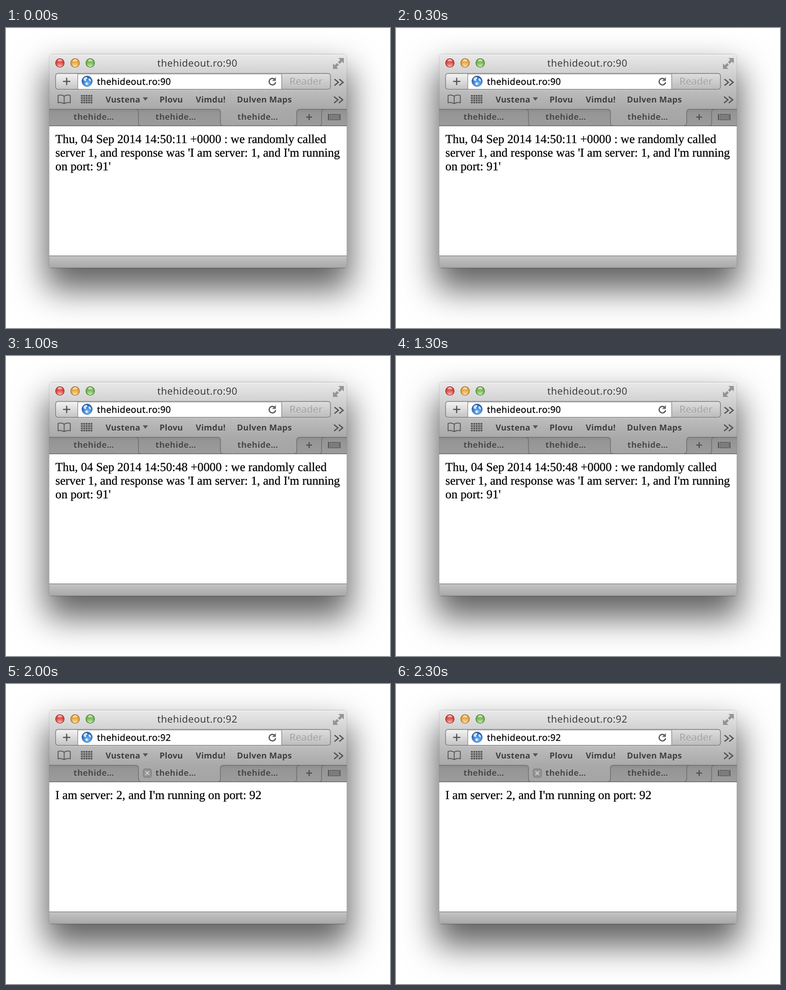
Recreate the animation shown at these times as an HTML page. Size 848 by 660 pixels, loop 2500 ms.

```html
<!DOCTYPE html>
<html lang="en">
<head>
<meta charset="utf-8">
<title>Load balancer demo</title>
<style>
  html, body { margin: 0; width: 100%; height: 100%; overflow: hidden; background: #fff; }
  .shadow {
    position: absolute; left: 96px; top: 58px; width: 656px; height: 470px;
    border-radius: 6px; box-shadow: 0 40px 72px 8px rgba(0, 0, 0, .62), 0 0 1px 1px rgba(0, 0, 0, .2);
  }
  svg { position: absolute; left: 0; top: 0; display: block; }
  text { font-family: "Noto Sans", "Open Sans", sans-serif; white-space: pre; text-rendering: geometricPrecision; }
  .title { font-size: 21.6px; letter-spacing: .45px; fill: #3b3b3b; text-anchor: middle; text-shadow: 0 1px rgba(255, 255, 255, .5); }
  .url { font-size: 20px; letter-spacing: .38px; }
  .url, .body { stroke: #000; stroke-width: .3; }
  .reader { font-size: 21.6px; letter-spacing: .2px; fill: #a0a0a0; text-shadow: 0 1px rgba(255, 255, 255, .5); }
  .label { font-size: 18.3px; font-weight: 700; letter-spacing: .3px; fill: #3d3d3d; text-shadow: 0 1px rgba(255, 255, 255, .35); }
  .tab { letter-spacing: .45px; fill: #474747; }
  .body { font: 26.75px "Liberation Serif", Times, serif; }
  .icon { fill: none; stroke: #515151; stroke-width: 2.6; }
  .thin { stroke-width: 1.8; }
  .edge { fill: none; stroke: #6c6c6c; stroke-width: 1.5; }
  .scene { opacity: 0; animation: show 2.5s step-end infinite; animation-delay: calc((var(--i) - 5) * .5s); }
  @keyframes show { 0% { opacity: 1; } 20%, 100% { opacity: 0; } }
</style>
</head>
<body>
<div class="shadow"></div>
<svg width="848" height="660" viewBox="0 0 848 660">
  <defs>
    <linearGradient id="chrome" x2="0" y2="1">
      <stop stop-color="#e9e9e9"/><stop offset=".65" stop-color="#bdbdbd"/><stop offset="1" stop-color="#a9a9a9"/>
    </linearGradient>
    <linearGradient id="strip" x2="0" y2="1">
      <stop stop-color="#888"/><stop offset=".2" stop-color="#959595"/><stop offset="1" stop-color="#9c9c9c"/>
    </linearGradient>
    <linearGradient id="front" x2="0" y2="1"><stop stop-color="#a9a9a9"/><stop offset="1" stop-color="#a5a5a5"/></linearGradient>
    <linearGradient id="foot" x2="0" y2="1"><stop stop-color="#c2c2c2"/><stop offset="1" stop-color="#a8a8a8"/></linearGradient>
    <linearGradient id="button" x2="0" y2="1"><stop stop-color="#f4f4f4"/><stop offset="1" stop-color="#c4c4c4"/></linearGradient>
    <linearGradient id="dim" x2="0" y2="1"><stop stop-color="#dedede"/><stop offset="1" stop-color="#bcbcbc"/></linearGradient>
    <linearGradient id="gloss" x2="0" y2="1">
      <stop stop-color="#fff" stop-opacity=".9"/><stop offset="1" stop-color="#fff" stop-opacity=".1"/>
    </linearGradient>
    <radialGradient id="glow" cy=".95" r=".6">
      <stop stop-color="#fff" stop-opacity=".65"/><stop offset="1" stop-color="#fff" stop-opacity="0"/>
    </radialGradient>
    <radialGradient id="sea" cx=".55" cy=".75" r=".8">
      <stop stop-color="#7cc4fa"/><stop offset=".5" stop-color="#3b86d8"/><stop offset="1" stop-color="#1f4f9e"/>
    </radialGradient>
    <clipPath id="frame"><path d="M95.5 64q0-6 6-6h645q6 0 6 6v458q0 6-6 6h-645q-6 0-6-6z"/></clipPath>
    <g id="more" class="icon"><path d="M0 0l8.5 7-8.5 7M10.5 0l8.5 7-8.5 7"/></g>
  </defs>

  <g clip-path="url(#frame)">
    <rect x="95" y="58" width="658" height="121" fill="url(#chrome)"/>
    <path d="M95 58.8h658" stroke="#f6f6f6" stroke-width="1.2"/>
    <rect x="95" y="178" width="658" height="38" fill="url(#strip)"/>
    <path d="M95 178.6h658" stroke="#6c6c6c" stroke-width="1.4"/>
    <rect x="95" y="216" width="658" height="286" fill="#fff"/>
    <rect x="95" y="502" width="658" height="26" fill="url(#foot)"/>
    <path d="M95 501.5h658" stroke="#6a6a6a" stroke-width="1.5"/>
    <path d="M95 503h658" stroke="#d8d8d8"/>
    <path d="M95 527.5h658" stroke="#8a8a8a"/>
  </g>

  <g id="lights"></g>
  <path d="M746 66v12l-4-4-5 5-4-4 5-5-4-4zM722 90v-12l4 4 5-5 4 4-5 5 4 4z" fill="#959595"/>

  <!-- address row -->
  <path d="M159 100h-44q-5.5 0-5.5 5.5v24q0 5.5 5.5 5.5h44z" fill="url(#button)"/>
  <path d="M608 100h103q5.5 0 5.5 5.5v24q0 5.5-5.5 5.5h-103z" fill="url(#dim)"/>
  <rect x="159" y="100" width="449.5" height="35" fill="#fff"/>
  <path d="M159 101.5h449" stroke="#ccc" stroke-width="2"/>
  <rect x="109.5" y="100" width="607" height="35" rx="5.5" fill="none" stroke="#777" stroke-width="1.4"/>
  <path d="M158.5 100v35M608.8 100v35" stroke="#858585" stroke-width="1.3"/>
  <path d="M112 136.4h602" stroke="#fff" stroke-opacity=".4"/>
  <path class="icon" d="M126 117.5h16M134 109.5v16"/>
  <circle cx="179" cy="117" r="11.5" fill="url(#sea)" stroke="#2c5c9f"/>
  <path d="M172 110q4-3 7-2l1 3-3 2v3l-3 1-3-3zM183 110l4 3 1 5-3-1-3-3zM177 119l4 2-1 4-3 1-2-4z" fill="#f0f7fd" opacity=".85"/>
  <path class="icon" d="M592.5 112.2a7.2 7.2 0 1 0 2.9 7" stroke="#6b6b6b"/>
  <path d="M596 108v8.5h-8.5z" fill="#6b6b6b"/>
  <text class="reader" x="626" y="125">Reader</text>
  <use href="#more" x="725.5" y="112.5"/>

  <!-- bookmarks -->
  <use href="#more" x="724.5" y="151"/>
  <path class="icon thin" d="M128.5 150q-6-4.5-13.5-1.5v16q7.500-2 13.5 2 6-4 13.5-2v-16q-7.500-3-13.5 1.5v16"/>
  <g id="grid" fill="#505050"></g>
  <g class="label">
    <text x="220" y="164">Vustena</text>
    <text x="339" y="164">Plovu</text>
    <text x="419" y="164">Vimdu!</text>
    <text x="510" y="164">Dulven Maps</text>
  </g>
  <path d="M302 152.5h11.5l-5.7 7.5z" fill="#555"/>

  <g id="scenes"></g>

  <!-- tab bar buttons -->
  <path class="icon" d="M663 196h13M669.5 189.5v13"/>
  <rect x="716" y="190" width="17.5" height="12" fill="#7c7c7c"/>
  <path d="M715 189.8h19.500M715 202.2h19.500" stroke="#5a5a5a" stroke-width="1.2"/>
  <path d="M712 189v14M737.5 189v14" stroke="#484848" stroke-width="2"/>
  <path d="M715 190v12M734.5 190v12" stroke="#5a5a5a" stroke-width="1.2"/>
</svg>
<script>
  const put = (id, html) => document.getElementById(id).innerHTML = html;
  const text = (cls, x, y, s) => `<text class="${cls}" x="${x}" y="${y}">${s}</text>`;

  const light = (x, color, rim) => `
    <circle cx="${x}" cy="78" r="10" fill="#fff" opacity=".5"/>
    <circle cx="${x}" cy="77" r="9.5" fill="${color}" stroke="${rim}" stroke-width="1.3"/>
    <circle cx="${x}" cy="77" r="9" fill="url(#glow)"/>
    <ellipse cx="${x}" cy="71.8" rx="5.2" ry="3" fill="url(#gloss)"/>`;
  put('lights', light(119, '#e1453f', '#8e2f2b') + light(152.5, '#eba53a', '#94651d') + light(186, '#72b84d', '#44752b'));

  let cells = '';
  for (let r = 0; r < 4; r++)
    for (let c = 0; c < 5; c++)
      cells += `<rect x="${165.5 + c * 5.3}" y="${147.5 + r * 4.9}" width="4" height="3.4"/>`;
  put('grid', cells);

  // Tab borders flare out at the top; side is 1 for a left border, -1 for a right one.
  const edge = (x, side) => {
    const r = 6 * side;
    return `M${x - r} 179q${r} 0 ${r} 6v24q0 6 ${r} 6`;
  };
  const bounds = [111.5, 292.5, 473.5, 642, 697];

  function tabs(active) {
    const left = bounds[active], right = bounds[active + 1];
    const borders = bounds.map((x, i) => i || !active ? edge(x, i <= active ? 1 : -1) : '').join('');
    const front = `${edge(left, 1)}H${right - 6}q6 0 6-6v-24q0-6 6-6v-1.5H${left - 6}z`;
    const labels = [149, 330, 511].map(x => text('label tab', x, 202, 'thehide…')).join('');
    const close = active === 1 ? `
      <rect x="303" y="187" width="18" height="18" rx="4" fill="#949494" stroke="#777" stroke-width="1.3"/>
      <path d="M308 192l8 8m0-8l-8 8" stroke="#d0d0d0" stroke-width="2.2"/>` : '';
    return `<path d="${front}" fill="url(#front)"/>
      <path class="edge" d="${borders}"/>
      <path d="M95.5 215.3h657" stroke="#686868" stroke-width="1.5"/>${labels}${close}`;
  }

  const reply = n => `I am server: ${n}, and I'm running`;
  const balanced = (sec, n) => ({
    port: 90, tab: 2,
    lines: [`Thu, 04 Sep 2014 14:50:${sec} +0000 : we randomly called`,
            `server ${n}, and response was '${reply(n)}`,
            `on port: 9${n}'`]
  });
  const direct = n => ({ port: 90 + n, tab: n - 1, lines: [`${reply(n)} on port: 9${n}`] });

  const scenes = [balanced(11, 1), balanced(25, 2), balanced(48, 1), direct(1), direct(2)];
  put('scenes', scenes.map(({ port, tab, lines }, i) => {
    const host = `thehideout.ro:${port}`;
    return `<g class="scene" style="--i:${i}">
      ${text('title', 422.5, 85, host)}
      ${text('url', 201, 125, host)}
      ${tabs(tab)}
      ${lines.map((s, k) => text('body', 109, 253 + 30 * k, s)).join('')}
    </g>`;
  }).join(''));
</script>
</body>
</html>
```
